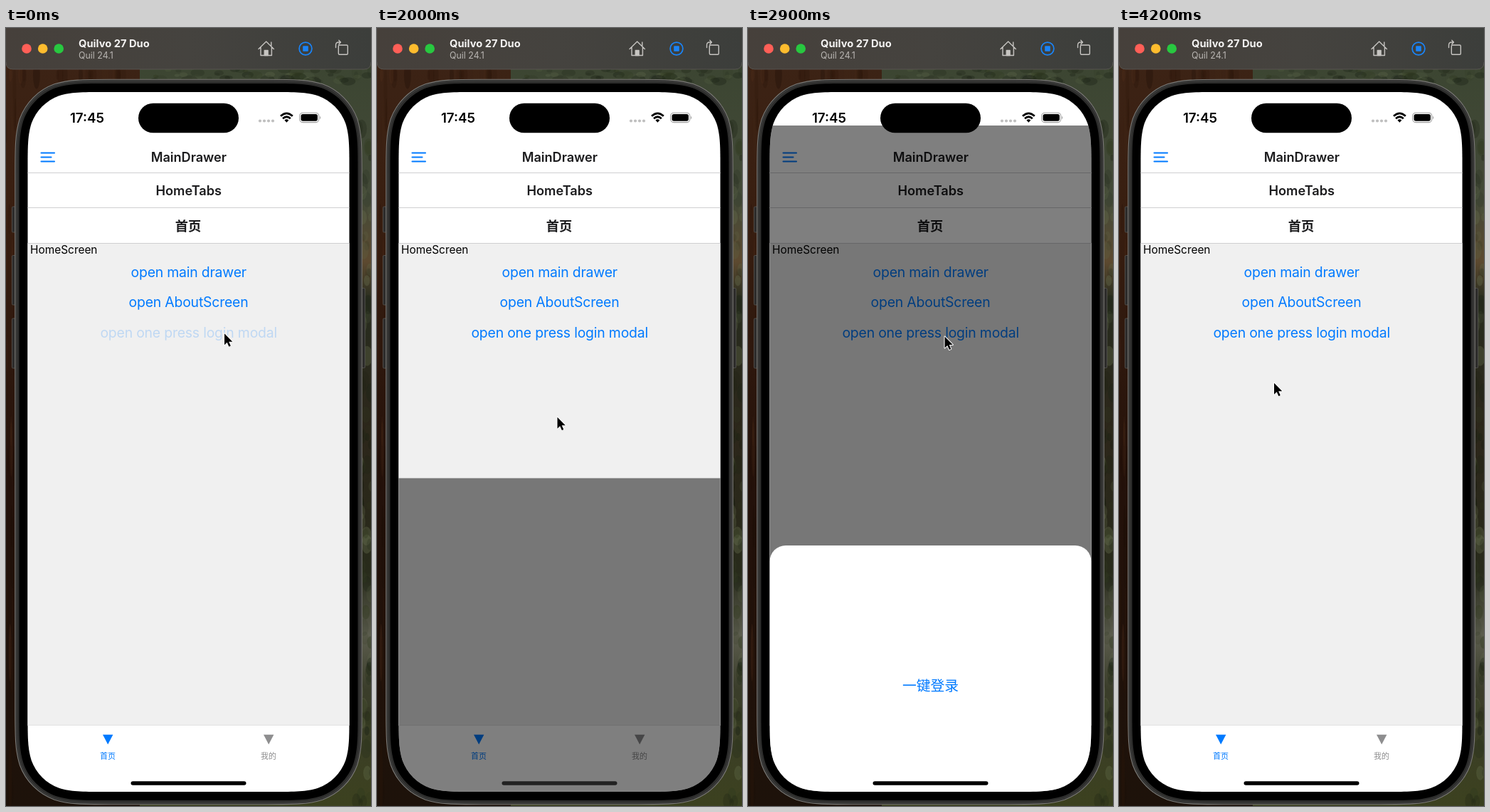
Animation, 513 px wide and 1093 px high, one loop 4.7 s. Source, as an HTML page:

```html
<!DOCTYPE html>
<html lang="zh">
<head>
<meta charset="utf-8">
<title>Login sheet demo</title>
<style>
  html, body { margin: 0; width: 100%; height: 100%; overflow: hidden; background: #1d120a; }
  svg { display: block; width: 100%; height: 100%; }
  text { font-family: Inter, "Noto Sans CJK SC", "Noto Sans CJK", sans-serif; }
  .mid { text-anchor: middle; }
  .head { font-size: 18.2px; font-weight: 600; fill: #1c1c1e; letter-spacing: -.04px; }
  .link { font-size: 19.4px; fill: #007aff; letter-spacing: -.19px; }
  .login { font-size: 19.8px; letter-spacing: 0; }
  .tab { font-size: 11px; font-weight: 500; }
  .rule { stroke: #cfcfd1; stroke-width: 1; }
  .tool { fill: none; stroke: #c6c4c1; stroke-width: 1.4; stroke-linejoin: round; stroke-linecap: round; }
</style>
</head>
<body>
<svg viewBox="0 0 513 1093" preserveAspectRatio="none">
  <defs>
    <linearGradient id="bark" x2="0" y2="1">
      <stop offset="0" stop-color="#3d2416"/>
      <stop offset=".25" stop-color="#381e10"/>
      <stop offset=".6" stop-color="#23110a"/>
      <stop offset="1" stop-color="#1d120a"/>
    </linearGradient>
    <linearGradient id="woods" x2="0" y2="1">
      <stop offset="0" stop-color="#3a4430"/>
      <stop offset=".22" stop-color="#434a38"/>
      <stop offset=".3" stop-color="#5d4a30"/>
      <stop offset=".35" stop-color="#282d1f"/>
      <stop offset=".52" stop-color="#2c261a"/>
      <stop offset=".7" stop-color="#282b1b"/>
      <stop offset=".78" stop-color="#5c5d4e"/>
      <stop offset=".85" stop-color="#3a3d2a"/>
      <stop offset="1" stop-color="#3c411f"/>
    </linearGradient>
    <linearGradient id="bar">
      <stop offset="0" stop-color="#46403b"/>
      <stop offset=".5" stop-color="#45433f"/>
      <stop offset="1" stop-color="#3c3e3b"/>
    </linearGradient>
    <clipPath id="clip"><path id="screen"/></clipPath>
  </defs>

  <rect width="513" height="1093" fill="url(#woods)"/>
  <rect width="188" height="1093" fill="url(#bark)"/>
  <g id="leaves"></g>

  <path d="M0 0H513V48Q513 58 503 58H10Q0 58 0 48Z" fill="url(#bar)"/>
  <path d="M0 48Q0 58 10 58H503Q513 58 513 48" fill="none" stroke="#5d5a56" stroke-width=".8"/>
  <circle cx="29" cy="29" r="6.8" fill="#ff5f57"/>
  <circle cx="51.7" cy="29" r="6.8" fill="#febc2e"/>
  <circle cx="74.2" cy="29" r="6.8" fill="#28c840"/>
  <text x="102" y="27" font-size="14.7" font-weight="700" fill="#f4f3f2">Quilvo 27 Duo</text>
  <text x="102" y="43" font-size="12.4" fill="#b9b6b3">Quil 24.1</text>
  <g class="tool">
    <path d="M355 29.5L365.7 19L376.4 29.5M358 27V38.5H373.4V27M372.8 25.5V20"/>
    <path d="M363.3 38.5V31.5H368.1V38.5Z" fill="#c6c4c1"/>
    <rect x="467.3" y="24" width="13" height="13.3" rx="1.5"/>
    <path d="M463.5 27.5V24Q463.5 20 467.5 20H469.5M467.8 17.3L470.4 20L467.8 22.7"/>
  </g>
  <circle cx="421" cy="29" r="8.9" fill="none" stroke="#1a84f8" stroke-width="1.7"/>
  <rect x="417.2" y="25.2" width="7.6" height="7.6" rx="1" fill="#1a84f8"/>

  <g fill="#2d2c2b" stroke="#595754" stroke-width=".8">
    <rect x="8.4" y="251" width="6" height="36" rx="1.5"/>
    <rect x="8.4" y="319.5" width="6" height="69.5" rx="1.5"/>
    <rect x="8.4" y="408" width="6" height="70" rx="1.5"/>
    <rect x="498.5" y="365.5" width="6.2" height="112" rx="1.5"/>
  </g>
  <path id="shell" fill="#2d2d2c" stroke="#7b7a77" stroke-width="1.1"/>
  <path id="band" fill="none" stroke="#3c3c3b" stroke-width="1.4"/>
  <path id="bezel"/>

  <g clip-path="url(#clip)">
    <rect x="30" y="90" width="453" height="984" fill="#fff"/>
    <rect x="30" y="302.5" width="453" height="677" fill="#f0f0f0"/>
    <path class="rule" d="M30 203.5H483M30 252.5H483M30 302.5H483"/>
    <path d="M30 979.5H483" stroke="#e2e2e2"/>
    <path d="M49.5 175.5H68M49.5 181.5H63.5M49.5 187.5H68" stroke="#007aff" stroke-width="2.1" stroke-linecap="round"/>
    <text class="mid head" x="256.8" y="188">MainDrawer</text>
    <text class="mid head" x="256.8" y="234.6">HomeTabs</text>
    <text class="mid head" x="256" y="284.7">首页</text>
    <text x="34.1" y="317.4" font-size="15.4">HomeScreen</text>
    <text class="mid link" x="256.7" y="349.7">open main drawer</text>
    <text class="mid link" x="256.5" y="392.2">open AboutScreen</text>
    <text class="mid link" id="press" x="256.7" y="434.6">open one press login modal</text>
    <g fill="#007aff">
      <path d="M136 992.7H150.4L143.2 1006.5Z"/>
      <text class="mid tab" x="143" y="1027">首页</text>
    </g>
    <g fill="#8e8e8f">
      <path d="M362 992.7H376.4L369.2 1006.5Z"/>
      <text class="mid tab" x="369" y="1027">我的</text>
    </g>
    <g id="modal">
      <rect x="30" y="90" width="453" height="984" fill="#000" fill-opacity=".5"/>
      <rect x="30.5" y="680" width="452" height="420" rx="22.5" fill="#fff"/>
      <text class="mid link login" x="256.5" y="884.3">一键登录</text>
    </g>

    <text class="mid" x="114" y="132.8" font-size="18.8" font-weight="600">17:45</text>
    <rect x="186" y="105.7" width="141" height="41.6" rx="20.8"/>
    <g fill-opacity=".25">
      <circle cx="357" cy="130.5" r="2.1"/><circle cx="363" cy="130.5" r="2.1"/>
      <circle cx="369" cy="130.5" r="2.1"/><circle cx="375" cy="130.5" r="2.1"/>
    </g>
    <g fill="none" stroke="#000" stroke-width="2.7">
      <path d="M386 123.8Q394.4 115.8 402.8 123.8"/>
      <path d="M389 127.3Q394.4 122.2 399.8 127.3"/>
    </g>
    <path d="M391.4 129.5Q394.4 127 397.4 129.5L394.4 132.8Z"/>
    <rect x="412.7" y="119.2" width="27" height="13.4" rx="4.3" fill="none" stroke="#000" stroke-opacity=".38" stroke-width="1.1"/>
    <rect x="414.5" y="121" width="23.4" height="9.8" rx="2.7"/>
    <path d="M441.2 123.7Q443.4 125.9 441.2 128.2Z" fill-opacity=".4"/>
    <rect id="grip" x="175.5" y="1058.3" width="162" height="5.5" rx="2.75"/>
  </g>

  <g id="cursor">
    <path d="M1 2V17.5L4.8 14L7.6 20.2L10.2 19L7.5 13H12.7Z" opacity=".18"/>
    <path d="M.5 .8V16.7L4.2 13.2L6.9 19.2L9.3 18.1L6.7 12.2H11.8Z" stroke="#fff" stroke-width="2" stroke-linejoin="round" paint-order="stroke"/>
  </g>
</svg>

<script>
const $ = id => document.getElementById(id);
const LOOP = 4700, STEP = 100, LAST = 4200;
const HEIGHT = 983, SLIDE = 497, FADE = 250;

// Start time of each slide and whether the sheet opens
const slides = [[0, true], [1887, false], [2623, true], [3650, false]];

// Cursor stops: time, x, y
const stops = [
  [0, 306.5, 428.5], [700, 306.5, 428.5], [1200, 221, 632], [1300, 221, 632],
  [1800, 253, 546], [2000, 253, 546], [2450, 283, 425], [2750, 283, 425],
  [3400, 217.5, 498]
];

const clamp = v => Math.min(1, Math.max(0, v));
const mix = (a, b, p) => a + (b - a) * p;
const inOut = p => p < .5 ? 2 * p * p : 1 - 2 * (1 - p) * (1 - p);
const cubic = (s, a, b) => 3 * (1 - s) * (1 - s) * s * a + 3 * (1 - s) * s * s * b + s * s * s;

// System sheet curve: bezier (.38, .7, .125, 1)
function sheetEase(x) {
  if (x <= 0 || x >= 1) return clamp(x);
  let lo = 0, hi = 1;
  for (let i = 0; i < 24; i++) {
    const s = (lo + hi) / 2;
    if (cubic(s, .38, .125) < x) lo = s; else hi = s;
  }
  return cubic(lo, .7, 1);
}

function sheetOffset(t) {
  const [start, opens] = slides.filter(s => s[0] <= t).pop();
  const p = sheetEase((t - start) / SLIDE);
  return HEIGHT * (opens ? 1 - p : p);
}

function linkOpacity(t) {
  const release = slides[2][0];
  if (t < 1000) return mix(.2, 1, inOut(clamp(t / FADE)));
  if (t < release) return mix(1, .2, inOut(clamp((t - 2470) / 150)));
  return mix(.2, 1, inOut(clamp((t - release) / FADE)));
}

function cursorAt(t) {
  const i = stops.findIndex(s => s[0] > t);
  if (i < 0) return stops[stops.length - 1].slice(1);
  const [a, b] = [stops[i - 1], stops[i]];
  const p = inOut((t - a[0]) / (b[0] - a[0]));
  return [mix(a[1], b[1], p), mix(a[2], b[2], p)];
}

function draw(t) {
  const off = sheetOffset(t);
  $("modal").setAttribute("transform", `translate(0 ${off.toFixed(2)})`);
  $("press").setAttribute("opacity", linkOpacity(t).toFixed(3));
  $("grip").setAttribute("fill", off > 370 && off < HEIGHT - 15 ? "#222" : "#000");
  $("cursor").setAttribute("transform", `translate(${cursorAt(t).join(" ")})`);
}

// Rectangle around the screen, grown by d, with continuous-curvature corners
function outline(d) {
  const x = 30.5 - d, y = 90 - d, w = 452 + 2 * d, h = 983 + 2 * d, r = 69.7 + d;
  const half = [[1.5287, 0], [1.0885, 0], [.8684, 0], [.6315, .0749], [.3728, .1691]];
  const corner = [...half, ...half.map(([a, b]) => [b, a]).reverse()];
  const place = (fx, fy) => ([a, b]) =>
    `${(fx ? x + w - a * r : x + a * r).toFixed(2)} ${(fy ? y + h - b * r : y + b * r).toFixed(2)}`;
  const part = (fx, fy, flip) => {
    const [first, ...rest] = (flip ? [...corner].reverse() : corner).map(place(fx, fy));
    return `L${first}C${rest.join(" ")}`;
  };
  const all = part(1, 0) + part(1, 1, true) + part(0, 1) + part(0, 0, true);
  return "M" + all.slice(1) + "Z";
}

// Soft blurred backdrop along the visible edges
function growLeaves() {
  let seed = 7;
  const rnd = () => (seed = seed * 16807 % 2147483647) / 2147483647;
  const blob = (x, y, rx, ry, fill) => {
    const size = .4 + rnd() * .9;
    return `<ellipse cx="${x.toFixed(1)}" cy="${y.toFixed(1)}" rx="${(rx * size).toFixed(1)}" ry="${(ry * size).toFixed(1)}" fill="${fill}" opacity="${(.1 + rnd() * .3).toFixed(2)}"/>`;
  };
  const pick = list => list[Math.floor(rnd() * list.length)];
  const greens = ["#151c12", "#1d2416", "#667050", "#30391f"];
  const browns = ["#1b0d06", "#4d2c19", "#2a1509"];
  let out = "";
  for (let i = 0; i < 110; i++) out += blob(492 + rnd() * 22, 60 + rnd() * 1033, 6, 11, pick(greens));
  for (let i = 0; i < 50; i++) out += blob(200 + rnd() * 313, 58 + rnd() * 18, 9, 5, pick(greens));
  for (let i = 0; i < 30; i++) out += blob(rnd() * 14, 60 + rnd() * 1033, 2, 40, pick(browns));
  for (let i = 0; i < 20; i++) out += blob(rnd() * 180, 66, 4, 16, pick(browns));
  $("leaves").innerHTML = out;
}

const layers = { screen: 0, bezel: 12, band: 15.5, shell: 17.7 };
for (const id in layers) $(id).setAttribute("d", outline(layers[id]));
growLeaves();

const origin = performance.now();
function tick() {
  const t = (performance.now() - origin) % LOOP;
  draw(Math.min(LAST, Math.floor(t / STEP) * STEP));
  requestAnimationFrame(tick);
}
tick();
</script>
</body>
</html>
```
